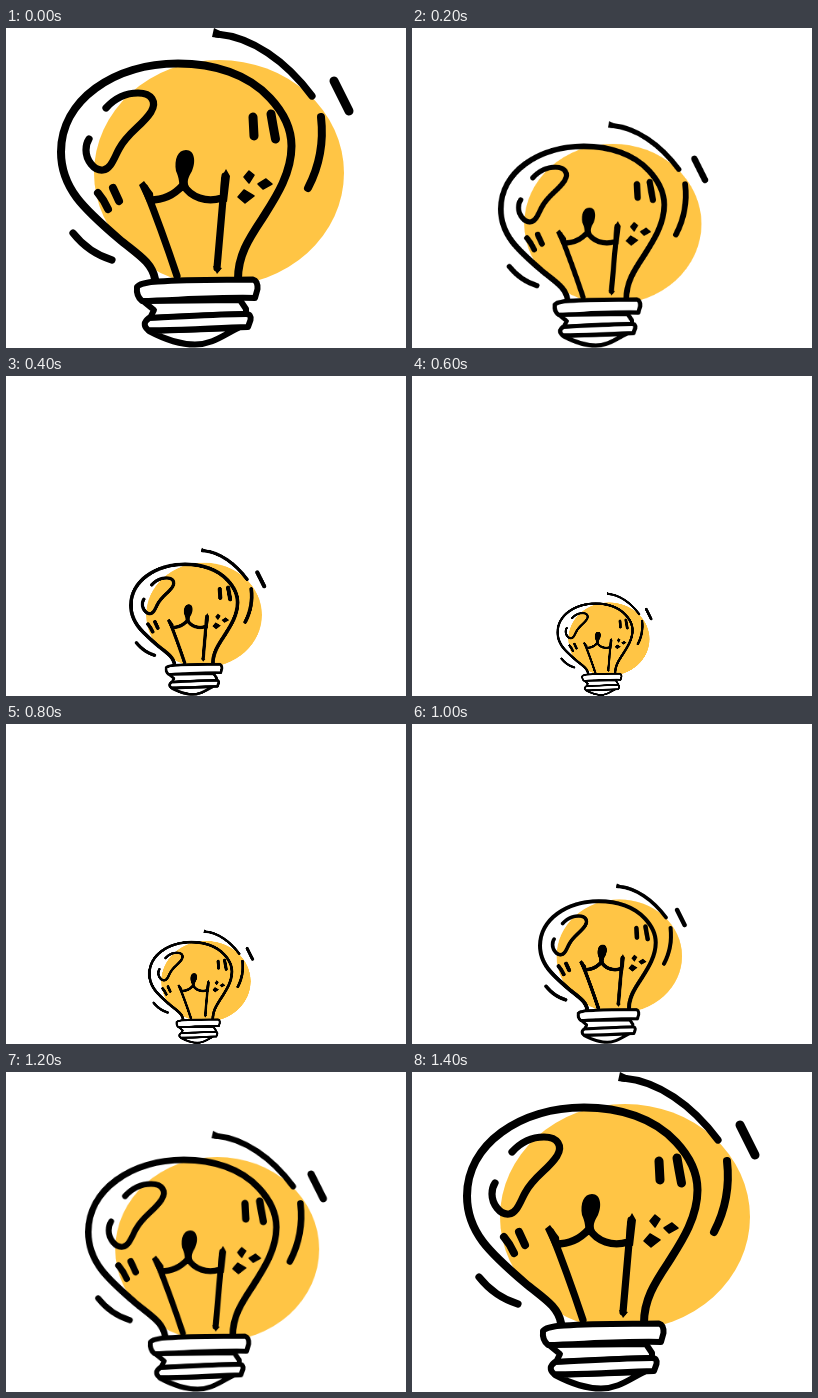
These frames come from a looping animation (400x320 px, 1600 ms). An HTML page:

```html
<!DOCTYPE html>
<html lang="en">
<head>
<meta charset="utf-8">
<title>Light bulb</title>
<style>
  html, body { margin: 0; width: 100%; height: 100%; overflow: hidden; background: #fff; }
  svg { display: block; width: 400px; height: 320px; }
  #bulb { transform-origin: 0 0; }
  .line { fill: none; stroke: #000; stroke-width: 8; stroke-linecap: round; stroke-linejoin: round; }
  .thin { stroke-width: 7.2; }
  .dash { stroke-width: 9; }
  .band { fill: #fff; stroke-width: 6; }
  .dots { stroke: #000; stroke-width: 1.5; stroke-linejoin: round; }
</style>
</head>
<body>
<svg viewBox="0 0 400 320">
  <g id="bulb">
    <ellipse cx="213" cy="145" rx="125" ry="113" fill="#ffc545"/>

    <!-- glass -->
    <path class="line" d="M149 251C146 234 131 226 113 211C78 181 55 160 55 124C55 72 108 35.5 172 35.5C208 35.5 242 46 264 70C278 85 285.5 100 285.5 118C285.5 147 268 172 256 191C242 212 232 228 232 251"/>
    <path class="line thin" d="M100 80C109 70 120 65 132 65C146 65 151 74 145 84C136 98 122 104 113 121C108 130 105 141 97 142C88 143 80 132 80 122C80 118 81 114 83 111"/>

    <!-- filament -->
    <path class="line thin" d="M139 160Q155 200 171 248M219 148L211 240M144 172C157 172 168 167 176 158M178 158C185 169 200 175 216 170"/>
    <path d="M180 122C189 122 190 134 186 143C182 150 180 154 184 161L173 164C174 156 173 150 170 143C168 131 172 122 180 122Z"/>
    <path d="M133 157L138 153L147 165L148 176L141 174ZM215 150L220 141L224 148L221 174L214 172ZM207 238L211 246L216 240Z"/>

    <!-- glints -->
    <path class="line dash" d="M247 89L248 108M265 86Q267 98 269.5 111"/>
    <path class="line" d="M92 165Q98 172 102 181M107 160L113 173"/>
    <path class="dots" d="M238 149L243 143L248 147L243 155ZM252 156L260 151L266 156L257 161ZM232 169L238 162L248 168L239 175Z"/>

    <!-- rays -->
    <path class="line thin" d="M211 6C246 9 280 33 306 68"/>
    <path d="M208 0L216 4L213 10L206 9Z"/>
    <path class="line dash" d="M328 53L343 83"/>
    <path class="line" d="M315 89C318 115 313 139 302 160"/>
    <path class="line thin" d="M67 205C78 219 90 227 106 232"/>

    <!-- cap -->
    <path class="line band" d="M143 303C158 311 172 316.5 189 316.5C206 316.5 216 308 232 300Z"/>
    <path class="line band" d="M137 273L148 282L144 290L240 286L240 281L234 272Z"/>
    <path class="line band" d="M143 290C172 289 210 286 240 286Q245.500 286 244.500 292L242 299C205 300 175 303 142 302Q135 296 143 290Z"/>
    <path class="line band" d="M131 259C133 256 142 254 152 253.500C185 251 220 252 247 251.500Q252 253 251.500 261L249 270C215 269 172 272 136 273Q130 268 131 259Z"/>
  </g>
</svg>
<script>
  // [x offset, scale]; the foot of the bulb stays on the stage floor
  const poses = [
    [0, 1], [49.8, 0.709], [99.4, 0.463], [127.7, 0.325],
    [123.7, 0.358], [100.4, 0.502], [37.4, 0.816], [0, 1]
  ];
  const floor = 320;
  const place = ([x, s]) => `translate(${x}px, ${floor * (1 - s)}px) scale(${s})`;

  const frames = [...poses, poses[0]].map((pose, i) => ({
    transform: place(pose),
    offset: i / poses.length,
    easing: 'step-end'
  }));
  document.getElementById('bulb').animate(frames, { duration: 1600, iterations: Infinity });
</script>
</body>
</html>
```
